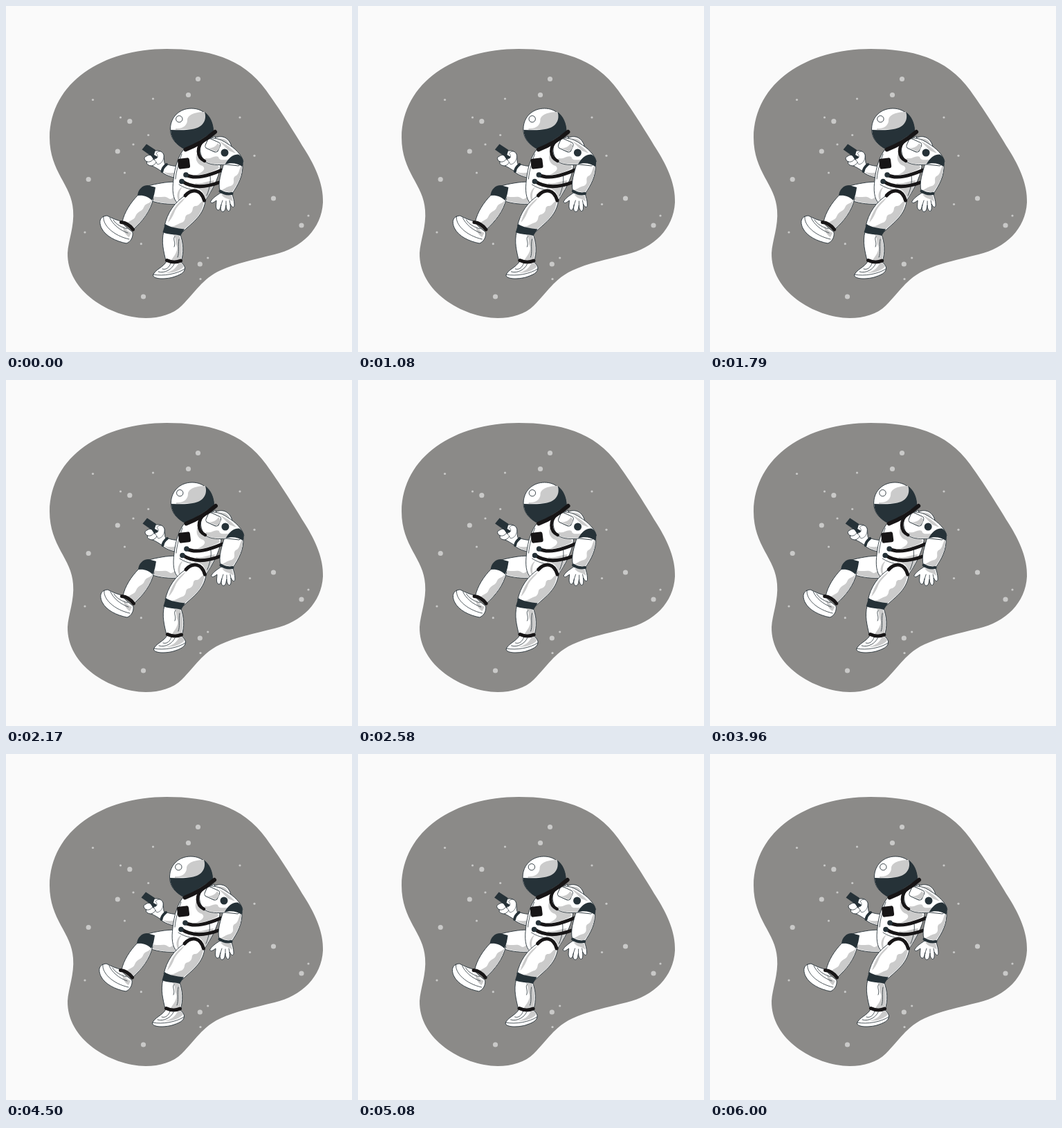
These frames come from a looping animation (500x500 px, 6040 ms). An HTML page:

```html
<!DOCTYPE html>
<html lang="en">
<head>
<meta charset="utf-8">
<title>Floating astronaut</title>
<style>
html, body { margin: 0; width: 100%; height: 100%; overflow: hidden; background: #fafafa; }
svg { display: block; width: 100vw; height: 100vh; }
.white { fill: #fff; stroke: #263238; stroke-width: .9; stroke-linejoin: round; }
.shade { fill: #cbcbcb; }
.dark { fill: #263238; }
.line { fill: none; stroke: #263238; stroke-width: .8; stroke-linecap: round; }
.band { fill: none; stroke: #171516; stroke-width: 5; stroke-linecap: round; }
.cuff { fill: none; stroke: #263238; stroke-width: 4; stroke-linecap: round; }
</style>
</head>
<body>
<svg viewBox="0 0 500 500">
  <path fill="#8b8a88" d="M232 62C290 62 342 74 376 122C396 150 410 172 432 208C447 232 459 258 458 284C456 322 427 350 388 359C360 366 331 372 310 382C284 394 273 414 254 433C242 445 222 451 202 451C150 450 88 412 89 357C90 339 99 318 97 295C95 258 63 240 63 190C64 110 140 62 232 62Z"/>
  <g id="stars" fill="#c9c9c8"></g>

  <g id="astronaut">
    <!-- backpack -->
    <path class="white" d="M299 192C309 186 320 188 325 200L328 214L306 216Z"/>
    <path class="shade" d="M306 192C315 190 321 194 323 202L312 198Z"/>

    <!-- far arm and phone -->
    <path class="white" d="M231 228C238 231 246 232 253 231L254 249C243 249 233 246 225 240Z"/>
    <path class="shade" d="M228 240C236 242 245 242 252 238L253 248C243 248 234 245 228 240Z"/>
    <path class="white" d="M212 211C217 207 226 209 228 215C229 221 228 226 230 229L225 239C220 236 216 233 211 231C206 231 202 228 204 225C199 223 199 218 203 217C206 214 211 217 212 211Z"/>
    <path class="dark" d="M203 199.500L216 208L214 215L221 219L214 223L210 217L196.500 207.500Z"/>
    <path class="white" d="M214 221C219 221 221 217 217 213C221 208 227 210 228 216C228 223 225 228 219 229Z" style="stroke-width:.6"/>
    <path class="line" d="M204 225C208 226 211 224 213 221M211 231C214 230 216 228 217 226"/>
    <path class="cuff" d="M232 229C228 232 226 235 225.500 239"/>

    <!-- far leg -->
    <path class="white" d="M205 260C217 257 231 254 246 254L250 286C235 287 222 286 208 281Z"/>
    <path class="shade" d="M213 275C222 278 230 273 235 278C239 281 243 276 245 273L248 285C235 286 222 285 210 280Z"/>
    <path class="white" d="M191 273C180 284 171 298 168 312L185 322C196 312 209 297 213 278C206 273 199 272 191 273Z"/>
    <path class="shade" d="M211 280C207 287 202 284 199 291C197 297 190 296 187 304C185 310 178 309 175 315L185 321C197 310 208 297 211 280Z"/>
    <path class="dark" d="M190 274C191 265 197 259 205 259L216 262C215 269 214 275 211 281C205 275 198 273 190 274Z"/>
    <path class="white" d="M146 303C154 307 161 310 167 311C171 319 179 323 183 327C184 334 180 341 174 343C159 340 144 333 138 321C134 312 135 304 146 303Z"/>
    <path class="shade" d="M169 318C173 324 177 326 181 328L178 334C173 331 169 325 169 318Z"/>
    <path class="line" d="M141 304C139 316 155 332 178 337M150 306C154 315 164 324 176 328M155 309C158 315 167 320 175 322"/>
    <path class="band" d="M166.500 312.500C173 313 179 317 183.500 323"/>

    <!-- torso -->
    <path class="white" d="M257 207C249 217 244 232 242 251C240 266 241 279 248 285C258 290 274 286 288 281C297 268 307 250 310 232L302 188Z"/>
    <path class="shade" d="M278 210C271 219 276 229 284 231C290 236 283 240 276 244C286 244 299 240 308 234L301 214ZM274 256C282 258 290 253 301 252C299 262 294 272 289 279C286 269 281 264 275 264C268 264 272 258 274 256ZM255 261C249 269 250 277 252 284C245 279 246 266 255 261Z"/>
    <path class="line" d="M254 214C250 225 246 238 245 250M250 258C256 262 262 264 267 265M294 242C297 249 295 262 290 274"/>
    <rect x="248.500" y="220" width="17" height="15" rx="3" fill="#171516" transform="rotate(-7 257 227)"/>
    <path class="band" d="M260 244C274 251 293 245 312 237M254 253C270 264 289 262 308 255"/>
    <circle cx="260" cy="244" r="3.800" class="dark"/>
    <circle cx="254" cy="253.500" r="3.800" class="dark"/>

    <!-- near leg -->
    <path class="white" d="M260 273C244 283 233 299 229 318L256 326C265 316 285 305 288 282C285 267 270 263 260 273Z"/>
    <path class="shade" d="M286 282C280 282 280 290 273 289C267 291 273 297 264 301C256 302 262 310 254 313C248 315 243 319 238 319L255 325C266 314 283 306 286 282ZM259 277C254 285 246 289 243 299C240 306 237 310 234 313C238 298 247 284 259 277Z"/>
    <path class="white" d="M228 326C224 341 228 355 231 368L253 370C257 356 257 343 251 328Z"/>
    <path class="shade" d="M241 330C247 335 244 342 247 347C249 354 243 361 239 367L252 368C256 355 255 341 250 330Z"/>
    <path class="line" d="M244 333C240 336 246 342 243 348M250 337C248 347 251 356 248 363"/>
    <path class="dark" d="M230 315C237 320 247 321 258 322.500L252 332C243 329 235 331 226.500 327Z"/>
    <path class="band" d="M259 274C269 263 282 265 286.500 281"/>
    <path class="white" d="M232 369C227 378 215 381 212.500 389C213 395 230 395 241 392C250 389 259 386 258.500 378C258 375 255 372 253 370Z"/>
    <path class="shade" d="M249 372C246 379 239 384 230 386C242 386 253 382 257 376L253 371Z"/>
    <path class="line" d="M213 388C227 391 248 387 258 380M220 384C230 387 240 380 243 373M226 380C232 382 236 377 238 372"/>
    <path class="band" d="M232.500 367.500C239 370.500 246 371 252.500 368"/>

    <!-- near arm -->
    <path class="white" d="M310 270C304 274 298 278 295.500 283C297 286 300 284 304 281C304 287 302 292 306 295C309 296 310 291 311 287C309 294 311 298 314 297C317 297 317 291 318 288C318 294 321 298 323 296C325 293 324 289 324 286C327 292 330 292 330 287C330 281 328 276 327 272Z"/>
    <path class="shade" d="M311 272L326 274L328 283C322 277 316 280 311 272Z"/>
    <path class="line" d="M311 287L313 281M318 288L318 282M324 286L323 281"/>
    <path class="white" d="M315 227C311 241 306 254 309 267C315 269 321 271 327 271C335 259 343 246 342 228Z"/>
    <path class="shade" d="M341 230C336 235 338 243 331 246C326 250 333 256 325 260C319 261 315 265 311 266L326 270C335 257 342 246 341 230Z"/>
    <path class="white" d="M286 194C296 188 309 191 320 199C330 205 341 215 343 225L336 231L318 229C307 230 295 230 288 225C279 216 278 202 286 194Z"/>
    <path class="shade" d="M288 220C296 222 301 215 307 218C308 224 315 222 320 222L318 228C306 229 295 229 288 224ZM308 195C318 200 327 206 332 213L322 209Z"/>
    <path class="dark" d="M316.500 229C321 220 328 214 336 214.500C342 218 344.500 224 341.500 232C334 227 325 226 316.500 229Z"/>
    <rect x="289" y="194" width="20" height="15" rx="4" class="white" transform="rotate(24 299 201)"/>
    <path class="shade" d="M306 198L309 202C309 206 306 210 303 210L291 205C297 206 303 204 306 198Z"/>
    <circle cx="316" cy="212" r="5.500" class="dark"/>
    <path class="band" style="stroke-width:4.500" d="M286 194C275 203 275 218 287 224"/>
    <path class="cuff" d="M309.500 267.500C315 271 321 272 326.500 271"/>

    <!-- helmet -->
    <path class="white" d="M259 207C246 201 237 191 237.500 177C238 160 251 148 268 148C285 148 298 160 299.500 181Z"/>
    <path class="shade" d="M245 177C257 178 262 171 262 165C262 157 274 153 287 153C291 161 287 172 279 176C268 180 257 177 245 179Z"/>
    <path class="dark" d="M238 179C248 179 258 180 269 178C284 176 291 165 287 153C295 159 300 169 300 181L259 207.500C246 201 238 191 238 179Z"/>
    <circle cx="250.300" cy="163.300" r="4.700" class="white"/>
    <path class="band" style="stroke-width:6" d="M259.500 207.500C274 202 289 193 302 182"/>
  </g>
</svg>
<script>
const stars = document.getElementById('stars');
const astronaut = document.getElementById('astronaut');

function addStars(r, points) {
  for (const [cx, cy] of points) {
    const star = document.createElementNS('http://www.w3.org/2000/svg', 'circle');
    for (const [key, value] of Object.entries({ cx, cy, r })) star.setAttribute(key, value);
    stars.append(star);
  }
}
addStars(3.6, [[277.5, 105.5], [263.5, 128.5], [178.8, 166.7], [161.3, 210], [119.2, 250.5],
  [386.5, 278], [427, 317], [280.3, 373], [198.5, 420]]);
addStars(1.6, [[212.5, 134], [125.5, 135.5], [165.5, 161], [338, 161], [205.7, 186.5], [184, 200],
  [171.5, 241], [359, 216.3], [352.5, 286.5], [437, 303], [114, 327], [195.3, 343.7],
  [291.7, 364], [281, 394.5]]);

// A slow sideways shake: linear moves between stops 600 ms apart.
const stops = [0, -1, 2, -4, 4, -4, 4, -4, 2, -1, 0];
const start = performance.now();

function draw(now) {
  const p = Math.min(Math.max(0, now - start) % 6040 / 600, 10);
  const i = Math.min(Math.floor(p), 9);
  const x = stops[i] + (stops[i + 1] - stops[i]) * (p - i);
  astronaut.setAttribute('transform', `translate(${x.toFixed(3)} 0)`);
  requestAnimationFrame(draw);
}
draw(start);
</script>
</body>
</html>
```
